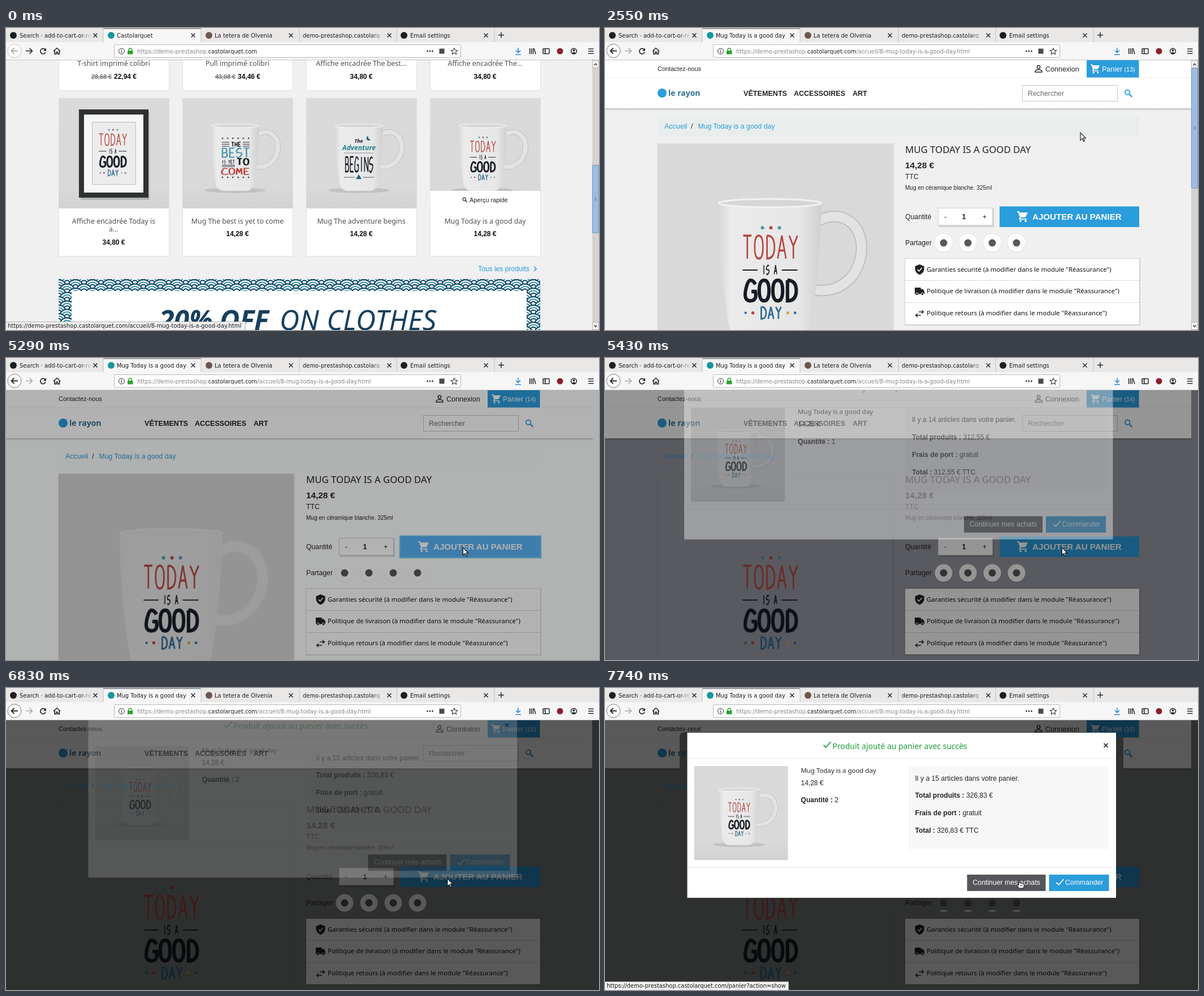
These frames come from a looping animation (1049x534 px, 8 s). An HTML page:

```html
<!DOCTYPE html>
<html lang="fr">
<head>
<meta charset="utf-8">
<title>Ajout au panier</title>
<style>
html, body { margin: 0; width: 100%; height: 100%; overflow: hidden; background: #f0f0f0; }
svg { display: block; }
#stage { width: 100vw; height: 100vh; }
text { fill: #232323; white-space: pre; }
.ui { font-family: "DejaVu Sans", sans-serif; fill: #1c1c1f; }
.sans { font-family: "Liberation Sans", Arial, sans-serif; }
.noto { font-family: "Noto Sans", sans-serif; }
.b { font-weight: 700; }
.i { font-style: italic; }
.mid { text-anchor: middle; }
.line { fill: none; stroke: #2a2a2e; stroke-width: 1.5; }
</style>
</head>
<body>
<svg id="stage" viewBox="0 0 1049 534" xmlns="http://www.w3.org/2000/svg"></svg>
<script>
const LOOP = 8000;
const BLUE = '#2b9cdc', RED = '#b8473f', TEAL = '#4a98ad', NAVY = '#171c27';
const SHOP = 'castolarquet.com';
const PAGE = '/accueil/8-mug-today-is-a-good-day.html';

// Markup helpers
const text = (x, y, s, size, cls = 'sans', fill = '', id = '') =>
  `<text x="${x}" y="${y}" font-size="${size}" class="${cls}"${fill && ` style="fill:${fill}"`}${id && ` id="${id}"`}>${s}</text>`;
const rect = (x, y, w, h, fill, more = '') =>
  `<rect x="${x}" y="${y}" width="${w}" height="${h}" fill="${fill}" ${more}/>`;
const dot = (x, y, r, fill, more = '') => `<circle cx="${x}" cy="${y}" r="${r}" fill="${fill}" ${more}/>`;
const line = (d, more = '') => `<path class="line" d="${d}" ${more}/>`;
const ink = (color, width) => `style="stroke:${color};stroke-width:${width}"`;
const group = (id, body, more = '') => `<g id="${id}" ${more}>${body}</g>`;
const photo = (x, y, size, body) =>
  `<svg x="${x}" y="${y}" width="${size}" height="${size}" viewBox="0 0 195 195">${body}</svg>`;
const cross = (x, y, r = 3.5) => line(`M${x - r} ${y - r}l${2 * r} ${2 * r}m0 ${-2 * r}l${-2 * r} ${2 * r}`);
const lens = (x, y, s, color) =>
  line(`M${x + s * .3} ${y + s * .3}l${s * .75} ${s * .75}`, ink(color, s * .35)) +
  `<circle cx="${x - s * .2}" cy="${y - s * .2}" r="${s * .65}" class="line" ${ink(color, s * .28)}/>`;
const tick = (x, y, color) => line(`M${x} ${y}l4 4l9-10`, ink(color, 1.8));
const cart = (x, y, s) => `<g transform="translate(${x} ${y}) scale(${s})">` +
  '<path d="M0 0h3l1 2h13l-4 7.5H6.5L5.5 11.5H15v1.7H3.5L2.7 12l1.7-2.6L1.7 1.7H0Z" fill="#fff"/>' +
  dot(5.5, 15.5, 1.6, '#fff') + dot(13.5, 15.5, 1.6, '#fff') + '</g>';

// Hand lettering on a 10 x 20 grid
const GLYPH = {
  T: 'M0 0H10M5 0V20', O: 'M5 0Q10 0 10 10T5 20T0 10T5 0', D: 'M1 0V20Q10 20 10 10T1 0',
  A: 'M0 20L5 0L10 20M2 13H8', Y: 'M0 0L5 9L10 0M5 9V20', I: 'M5 0V20',
  S: 'M9 2Q5 -2 1 4T5 10T8 17T0 18', G: 'M10 4Q8 0 5 0T0 10T5 20T10 11H6',
  B: 'M1 0V20H5Q10 20 10 15T5 10H1M5 10Q9 10 9 5T5 0H1', E: 'M10 0H1V20H10M1 10H8',
  N: 'M0 20V0L10 20V0', M: 'M0 20L1 0L5 12L9 0L10 20', C: 'M10 3Q8 0 5 0T0 10T5 20T10 17',
  H: 'M1 0V20M9 0V20M1 10H9'
};
const lettering = (word, x, y, w, h, color, weight) => {
  const sx = w / (14 * word.length - 4), sy = h / 20;
  return `<g transform="translate(${x} ${y}) scale(${sx} ${sy})" fill="none" stroke="${color}" stroke-width="${weight * 2 / (sx + sy)}">` +
    [...word].map((c, i) => c === ' ' ? '' : `<path d="${GLYPH[c]}" transform="translate(${14 * i})"/>`).join('') + '</g>';
};
const flags = (y, color) => [...Array(6)].map((_, i) =>
  `<path d="M${70 + 9.2 * i} ${y - 1.6}l3 1.600l-3 1.600z" fill="${color}"/>`).join('');

const todayArt =
  dot(87, 69.5, 1.4, TEAL) + dot(94, 69.5, 1.4, RED) + dot(101, 69.5, 1.4, TEAL) +
  lettering('TODAY', 71, 76, 45, 19, RED, 1.5) +
  lettering('IS A', 87, 100.5, 12, 7.5, NAVY, .9) +
  line('M70.5 104.5H83M103 104.5H116', ink(NAVY, .9)) +
  lettering('GOOD', 73, 113, 42, 17, NAVY, 2.9) +
  lettering('DAY', 85.5, 135, 17, 10, '#2c6a94', 1.3) +
  dot(73, 140, 1, '#2c6a94') + dot(79, 140, 1.3, RED) + dot(108, 140, 1.2, '#d9a04a') + dot(114, 140, 1.1, '#2c6a94');
const bestArt = flags(71, NAVY) + lettering('THE', 87, 78, 16, 7.5, NAVY, 1.4) +
  line('M70 78H83M70 81.5H83M70 85H83M107 78H119M107 81.5H119M107 85H119', ink(NAVY, .9)) +
  lettering('BEST', 70, 88.5, 48, 16, TEAL, 2.3) +
  lettering('IS YET', 70, 109.5, 22, 6.5, NAVY, .9) + lettering('TO', 97, 107, 20, 11, NAVY, 2.4) +
  line('M70 118.500H93M70 121H93', ink(NAVY, .9)) +
  lettering('COME', 70, 124, 48, 11, RED, 2.2) + flags(140, NAVY);
const adventureArt = text(93, 79, 'The', 9, 'noto i b mid', NAVY) +
  '<path d="M110 67a4 4 0 1 0 4 6a4 4 0 0 1-4-6z" fill="#1d5c78"/>' +
  text(93.5, 92, 'Adventure', 12.1, 'noto i b mid', '#24818a') +
  line('M67 97H120', 'stroke-dasharray="1.2 1.6" ' + ink(NAVY, 1)) +
  lettering('BEGINS', 69, 104, 49, 26, NAVY, 2.3) +
  line('M67 140H86M101 140H120', 'stroke-dasharray="2 1" ' + ink(NAVY, 1)) +
  '<path d="M88 143l5-8l5 8z" fill="#1d5c78"/>';

const mugBody = `<ellipse cx="93" cy="163" rx="54" ry="5" fill="#999" opacity=".35"/>
  <path d="M133 64C152 53 171 66 169 90C166 112 150 124 130 121" fill="none" stroke="#bdbdbd" stroke-width="9.5"/>
  <path d="M133 64C152 53 171 66 169 90C166 112 150 124 130 121" fill="none" stroke="#e3e3e3" stroke-width="7.8"/>
  <path d="M50.5 49C51 90 55 128 59 150Q61 163 73 164H113Q125 163 127 150C131 128 135 90 136 49Z" fill="url(#mugFill)"/>
  <ellipse cx="93.3" cy="49" rx="42.6" ry="3.4" fill="#d6d6d6" stroke="#f2f2f2" stroke-width="1.4"/>`;
const backdrop = rect(0, 0, 195, 195, 'url(#wall)');
const mug = art => backdrop + mugBody + art;
const poster = backdrop + rect(39, 24, 122, 156, '#000', 'opacity=".15"') + rect(36, 20, 123, 156, '#2f3233') +
  rect(45, 29, 105, 138, '#f6f6f6') + rect(59.5, 42.5, 77, 110, '#ececec', 'stroke="#bbb"') +
  `<g transform="translate(-5 -19) scale(1.08)">${todayArt}</g>`;

const waves = () => {
  let s = '';
  for (let row = 0; row < 6; row++)
    for (let x = -30 + row % 2 * 15; x <= 60; x += 30)
      [[15, '#17486b'], [12.8, '#fff'], [10.6, '#2a93a8'], [8.4, '#fff'], [6.2, '#17486b'], [4, '#fff']]
        .forEach(([r, c]) => s += dot(x, row * 7.5, r, c));
  return `<pattern id="waves" x="93" y="444" width="30" height="15" patternUnits="userSpaceOnUse"><g transform="translate(0 -15)">${s}</g></pattern>`;
};
const defs = `<defs>${waves()}
  <linearGradient id="mugFill"><stop offset="0" stop-color="#d8d8d8"/><stop offset=".12" stop-color="#ebebeb"/><stop offset=".8" stop-color="#e6e6e6"/><stop offset="1" stop-color="#cfcfcf"/></linearGradient>
  <linearGradient id="wall" x2="0" y2="1"><stop offset="0" stop-color="#dadada"/><stop offset=".8" stop-color="#d9d9d9"/><stop offset="1" stop-color="#d2d2d2"/></linearGradient>
  <linearGradient id="fade"><stop offset="0" stop-color="#e9e8e7" stop-opacity="0"/><stop offset="1" stop-color="#e9e8e7"/></linearGradient>
  <linearGradient id="under" x2="0" y2="1"><stop offset="0" stop-opacity=".22"/><stop offset="1" stop-opacity="0"/></linearGradient>
  <filter id="dim" filterUnits="userSpaceOnUse" x="0" y="0" width="1049" height="534" color-interpolation-filters="sRGB">
    <feComponentTransfer>${['R', 'G', 'B'].map(c => `<feFunc${c} class="slope" type="linear" slope="1"/>`).join('')}</feComponentTransfer></filter></defs>`;

// Product listing
const columns = [93, 312, 531, 750];
const card = (x, y, h) => rect(x + .5, y + .5, 195, h, '#fff', 'stroke="#e0e0e0"');
const price = (x, y, s) => text(x, y, s, 12, 'sans b mid', '#111');
const sale = (x, old, now) => text(x - 21.5, 90, old, 10.8, 'sans b mid', '#6c6c6c') +
  line(`M${x - 40} 86.5h37`, ink('#6c6c6c', 1)) + price(x + 20.5, 90, now);
const heading = (i, y, s) => text(columns[i] + 97.5, y, s, 12.4, 'noto mid', '#4b5254');
const listing = rect(0, 57, 1049, 477, '#f0f0f0') +
  columns.map(x => card(x, 40, 70) + card(x, 124, 279)).join('') +
  ['T-shirt imprimé colibri', 'Pull imprimé colibri', 'Affiche encadrée The best...', 'Affiche encadrée The...']
    .map((s, i) => heading(i, 67, s)).join('') +
  sale(190.5, '28,68 €', '22,94 €') + sale(409.5, '43,08 €', '34,46 €') + price(628.5, 90, '34,80 €') + price(847.5, 90, '34,80 €') +
  [poster, mug(bestArt), mug(adventureArt), mug(todayArt)].map((p, i) => photo(columns[i], 124, 195, p)).join('') +
  ['Affiche encadrée Today is', 'Mug The best is yet to come', 'Mug The adventure begins', 'Mug Today is a good day']
    .map((s, i) => heading(i, 346, s)).join('') + heading(0, 360, 'a...') +
  price(190.5, 383, '34,80 €') + [1, 2, 3].map(i => price(columns[i] + 97.5, 368, '14,28 €')).join('') +
  rect(750.5, 288, 194.5, 32, '#fff') + lens(811.5, 303.5, 4, '#232323') + text(820, 308, 'Aperçu rapide', 10.9) +
  text(835, 430, 'Tous les produits', 12.1, 'sans', BLUE) + line('M934 422l4 4l-4 4', ink(BLUE, 1.6)) +
  rect(93, 444, 852, 90, 'url(#waves)') + rect(116, 465, 805, 69, '#fff') +
  text(271, 533.5, '20% OFF', 48.3, 'noto b i', '#17405f') +
  `<g letter-spacing=".6">${text(484, 533.5, 'ON CLOTHES', 48.3, 'noto i', '#17405f')}</g>`;

// Product page
const socialX = [599, 642, 685, 728];
const paper = rect(0, 57, 1037, 85, '#fff') + rect(0, 87.5, 1037, 1, '#efefef') + rect(0, 142, 1038, 4, 'url(#under)') +
  rect(93, 155, 852, 37, '#e9eeed', 'id="crumbs"') +
  rect(738.5, 101.5, 168, 28, '#fff', 'stroke="#c4c6c7"') +
  rect(590, 319, 98, 33, '#000', 'opacity=".12"') + rect(589.5, 318.5, 96, 30, '#fff', 'stroke="#c9d3d6"') +
  socialX.map(x => dot(x, 381, 16, '#000', 'opacity=".06"') + dot(x, 380, 15.5, '#fff')).join('') +
  rect(530, 407, 417, 119, '#000', 'opacity=".13"') + rect(531, 408, 414, 116, '#fff') +
  line('M531 446.5H945M531 485.5H945', ink('#d8d8d8', 1));
const assurance = (y, s) => text(569, y, s + ' (à modifier dans le module "Réassurance")', 11.4, 'noto', '#111');
const inkLayer =
  text(93, 76, 'Contactez-nous', 11) +
  '<circle cx="767" cy="69" r="2.7" class="line"/>' + line('M761 78v-1.5q1-3 6-3t6 3V78z') +
  text(779, 77, 'Connexion', 12.5) + rect(852, 57, 92.5, 30.5, BLUE) + cart(859, 64, .95) +
  text(879, 77, 'Panier', 12.5, 'sans', '#fff') + text(918.5, 77, '(13)', 10.8, 'sans', '#fff', 'count') +
  dot(101, 115, 8, BLUE) + text(112, 120, 'le rayon', 14, 'noto b', '#2f6f96') +
  text(245, 120, 'VÊTEMENTS', 12.6, 'sans b') + text(334, 120, 'ACCESSOIRES', 12.5, 'sans b') + text(438, 120, 'ART', 12.5, 'sans b') +
  text(748, 120, 'Rechercher', 12.4, 'sans', '#666d70') + lens(925.5, 115, 6.5, BLUE) +
  text(105, 178, 'Accueil', 12.5, 'sans', BLUE) + text(152, 178, '/', 12.3) + text(164.5, 178, 'Mug Today is a good day', 12.25, 'sans', BLUE) +
  photo(93, 205, 416, todayArt) +
  text(531, 221, 'MUG TODAY IS A GOOD DAY', 16.8, 'noto') + text(531, 248, '14,28 €', 15.3, 'sans b') +
  text(531, 267, 'TTC', 12.3) + text(531, 286, 'Mug en céramique blanche. 325ml', 10) +
  text(531, 338, 'Quantité', 12.25) + text(602, 338, '-', 12, 'sans mid') + text(635, 338, '1', 12.5, 'sans b mid') + text(671.5, 338, '+', 12, 'sans mid') +
  rect(697, 315, 249, 38, 'none', 'id="focus" stroke="#6fd0f0" stroke-width="2.5"') + rect(698, 315.5, 247, 36.5, BLUE, 'id="add"') +
  cart(729, 324, 1.12) + text(756, 339, 'AJOUTER AU PANIER', 15.1, 'sans b', '#fff') +
  text(531, 384, 'Partager', 12.25) + socialX.map(x => dot(x, 380, 6.5, '#58595d')).join('') +
  assurance(431, 'Garanties sécurité') + assurance(469, 'Politique de livraison') + assurance(508, 'Politique retours') +
  '<path d="M556.500 418l8 3.300v6q-1 6-8 9q-7-3-8-9v-6z" fill="#222"/>' + line('M552.500 427l3 3l5-6', ink('#fff', 1.6)) +
  '<path d="M548 459h10.500v2.500h3.500l3 4v5h-17z" fill="#222"/>' + dot(552, 470.5, 2.2, '#222', 'stroke="#fff"') + dot(561.5, 470.5, 2.2, '#222', 'stroke="#fff"') +
  line('M555 502h8m-3-3l3.500 3l-3.500 3M559 508h-9m3-3l-3.500 3l3.500 3');
const product = rect(0, 57, 1049, 477, '', 'class="bg"') +
  rect(92, 204, 419, 340, '#000', 'opacity=".07"') + rect(93, 205, 416, 329, '', 'id="wallFill"') +
  group('mugBody', photo(93, 205, 416, mugBody)) +
  group('paper', paper) + rect(123, 78, 792, 315, '', 'id="halo" class="bg" rx="8"') + group('ink', inkLayer);

// Confirmation dialog
const row = (x, y, label, value) => text(x, y, `<tspan class="b">${label} :</tspan> ${value}`, 12.1);
const dialog = (id, dx, count, qty, total) => group(id, `<g transform="translate(${dx} 0)">` +
  rect(140, 79, 758.5, 292, '#fff') + line('M140 124.500h758M140 317.500h758', ink('#e7e7e7', 1)) +
  tick(381, 101, '#1f9d3a') + text(397, 107.5, 'Produit ajouté au panier avec succès', 13.9, 'noto', '#1f9d3a') +
  line('M877 98l7 7m0-7l-7 7', ink('#444', 2)) + photo(152, 138, 166.3, mug(todayArt)) +
  text(341, 149.5, 'Mug Today is a good day', 11.45, 'noto') + text(341, 171.5, '14,28 €', 12) + row(341, 202, 'Quantité', qty) +
  rect(531, 138, 355, 147, '#f7f7f7') + text(543, 163.5, `Il y a ${count} articles dans votre panier.`, 12.15) +
  row(543, 194, 'Total produits', total + ' €') + row(543, 225, 'Frais de port', 'gratuit') + row(543, 256, 'Total', total + ' € TTC') +
  rect(635, 330, 139, 29, '#55565b') + text(645, 348, 'Continuer mes achats', 12.25, 'sans', '#fff') +
  rect(780, 330, 106, 29, BLUE) + tick(793, 344, '#fff') + text(808.5, 348, 'Commander', 12.25, 'sans', '#fff') + '</g>');

const status = (id, w, path) => group(id, rect(-.5, 519.5, w, 15, '#efefef', 'stroke="#b5b5b5"') +
  text(3, 530, 'https://demo-prestashop.' + SHOP + path, 9.93, 'ui'));

// Browser window
const scrollbar = rect(1037, 57, 12, 477, '#d5d2cf') + rect(1037.5, 57.5, 11, 13, '#f3f2f1', 'stroke="#b9b6b3"') +
  rect(1037.5, 520.5, 11, 13, '#f3f2f1', 'stroke="#b9b6b3"') +
  line('M1040.500 66l2.500-3l2.500 3M1040.500 525.500l2.500 3l2.500-3', ink('#333', 1.2)) +
  rect(1037.5, 71, 11, 212, '#9dbce0', 'id="thumb" stroke="#6f93bf"') +
  group('grip', line('M1041 175h4m-4 2h4m-4 2h4', ink('#557aa8', .8)));
const back = (on, c) => line('M21 40.500H10m4.500-5l-5 5l5 5', ink(c, 1.8));
const chrome = rect(0, 0, 1049, 26, '#e9e8e7') + rect(172, 0, 173, 26, '#f6f6f7') + rect(172, 0, 173, 2, '#9ba0a6') +
  rect(0, 25, 1049, 32, '#f6f6f7') + rect(0, 56, 1049, 1, '#c6c6c6') +
  [172, 345, 519, 691, 864].map(x => rect(x - .5, 0, 1, 25, '#c2c2c2')).join('') +
  [158, 331, 504, 678, 849].map(x => cross(x, 13)).join('') + line('M871 12.500h10m-5-5v10') +
  dot(13, 13, 6, '#1b1f23') + dot(186, 13, 6, '#15989d', 'id="favicon"') + dot(359, 13, 6, '#6d564d') + dot(704, 13, 6, '#1b1f23') +
  text(24, 16.5, 'Search · add-to-cart-or-re', 10, 'ui') + text(196, 16.5, '', 9.95, 'ui', '', 'tab') +
  text(369, 16.5, 'La tetera de Olvenia', 10, 'ui') + text(525, 16.5, 'demo-prestashop.castolarq', 9.95, 'ui') + text(715, 16.5, 'Email settings', 10, 'ui') +
  rect(130, 5, 22, 18, 'url(#fade)') + rect(646, 5, 24, 18, 'url(#fade)') +
  dot(15, 40.5, 12, '#fff', 'id="backRing"') + group('back', line('M21 40.500H10m4.500-5l-5 5l5 5', ink('#2a2a2e', 1.8))) +
  group('forward', line('M35 40.500H46m-4.500-5l5 5l-5 5', ink('currentColor', 1.6))) +
  group('reload', line('M69.500 38.500A4.700 4.700 0 1 0 70 42.500', ink('currentColor', 1.7)) + '<path d="M71 35.500v5h-5z" fill="currentColor"/>') +
  group('stop', cross(65.5, 41, 4)) +
  line('M84 41l6-5.500l6 5.500M86 40v6h3v-3.500h2.500V46h3v-6', ink('#222', 1.6)) +
  rect(191.5, 29.5, 613, 22.5, '#fff', 'rx="2" stroke="#b6b6b9"') +
  '<circle cx="204.500" cy="41" r="5" class="line" style="stroke-width:1"/>' + line('M204.500 40v4m0-6v1', ink('#333', 1.2)) +
  rect(215, 40, 9.5, 6.5, '#2ca32f', 'rx="1"') + line('M217 40.500v-2a2.700 2.700 0 0 1 5.500 0v2', ink('#2ca32f', 1.5)) +
  text(232, 44.5, `<tspan style="fill:#85858a">https://demo-prestashop.</tspan>${SHOP}<tspan id="path" style="fill:#85858a"></tspan>`, 9.93, 'ui') +
  [745.5, 750, 754.5].map(x => dot(x, 41, 1.4, '#333')).join('') + rect(766.5, 36.5, 9, 9, '#4a4a4f') +
  line('M793 35.500l1.700 3.800l4 .4l-3 2.700l.9 4l-3.600-2.100l-3.600 2.100l.9-4l-3-2.700l4-.4z', ink('#333', 1.1)) +
  line('M906 35v8m-4-3.500l4 4l4-4M901 47h10', ink('#2b8de0', 1.6)) +
  line('M926.500 36v10m3-10v10m3-10v10m1.500-10l3 10') +
  '<rect x="950" y="36.500" width="11" height="9" rx="1" class="line"/>' + line('M954 36.500v9m-2.500-6.500h1m-1 2.500h1') +
  dot(980, 41, 5.5, '#8c1f2b') + '<circle cx="1004.500" cy="41" r="5" class="line"/>' + dot(1004.5, 39.5, 1.9, '#2a2a2e') +
  '<path d="M1001 44.500q3.500-4 7 0q-3.500 2.500-7 0z" fill="#2a2a2e"/>' + line('M1030 37h9.500m-9.500 4h9.500m-9.500 4h9.500');
const pointer = group('pointer',
  group('arrow', '<path d="M0 0v13.500l3.200-2.900l2.300 4.900l2-1l-2.300-4.700h4.200z" fill="#fff" stroke="#111" stroke-width="1.1"/>') +
  group('hand', '<path d="M-1-1.500q1-1.200 2 0V3l6 1.200q1.500.4 1.300 2.300l-.8 5.500H-.500l-3.700-5q.2-2 3.200.1z" fill="#fff" stroke="#111"/>' + line('M2.500 6v3m2.300-3v3', ink('#111', .8))));

const stage = document.getElementById('stage');
stage.innerHTML = defs + group('listing', listing) + group('product', product) +
  dialog('first', 0, 14, 1, '312,55') + dialog('second', 5.5, 15, 2, '326,83') +
  group('scrollbar', scrollbar) + status('itemLink', 424, PAGE) + status('cartLink', 325, '/panier?action=show') + chrome + pointer;

// Timelines: [ms, values...]
const CURSOR = [[2910, 841, 185], [3250, 836, 232], [3680, 809, 335], [6650, 808, 335], [6830, 781, 337], [7100, 768, 337], [7460, 764, 339], [7740, 733, 342]];
// brightness, page grey (r, g, b), photo wall (r, g, b), mug opacity
const DIM = [[5210, 1, 240, 240, 240, 217, 217, 217, 1], [5290, .7, 178, 179, 179, 149, 149, 149, .12],
  [5400, .585, 89, 90, 95, 89, 90, 95, 0], [6650, .585, 89, 90, 95, 89, 90, 95, 0], [6770, .35, 46, 48, 47, 46, 48, 47, 0]];
const BUTTON = [[3680, 43, 156, 220], [3870, 35, 145, 160], [4630, 35, 145, 160], [5000, 89, 178, 245], [5290, 89, 178, 245], [5430, 43, 156, 220]];
// opacity, vertical offset
const FIRST = [[5370, 0, -73], [5520, 1, -17], [5680, 1, 0]];
const SECOND = [[6740, 0, -73], [6830, .18, -36], [6910, 1, -12], [7040, 1, 0]];

const at = (table, t) => {
  const next = table.findIndex(k => k[0] > t);
  if (next === 0) return table[0].slice(1);
  if (next < 0) return table[table.length - 1].slice(1);
  const a = table[next - 1], b = table[next], p = (t - a[0]) / (b[0] - a[0]);
  return a.slice(1).map((v, i) => v + (b[i + 1] - v) * p);
};
const el = id => document.getElementById(id);
const show = (id, on) => { el(id).style.display = on ? '' : 'none'; };
const rgb = c => `rgb(${c.map(Math.round)})`;
const pose = (id, [opacity, dy]) => {
  el(id).style.opacity = opacity;
  el(id).setAttribute('transform', `translate(0 ${dy})`);
};

function render(t) {
  const loaded = t >= 1880, loading = t >= 1440 && t < 2270;
  show('listing', !loaded);
  show('product', loaded);
  show('itemLink', t < 1480);
  show('cartLink', t >= 7100);
  el('tab').textContent = loaded ? 'Mug Today is a good day' : 'Castolarquet';
  el('path').textContent = loaded ? PAGE : '';
  el('favicon').setAttribute('cx', loading ? 186 + 4 * Math.sin(t / 130) : 186);
  el('favicon').setAttribute('r', loading ? 2.5 : 6);
  el('backRing').setAttribute('stroke', loaded ? '#77777b' : '#c4c4c6');
  el('back').style.opacity = loaded ? 1 : .4;
  el('forward').style.color = loaded ? '#aaaaad' : '#222226';
  show('reload', !loading);
  show('stop', loading);
  el('reload').style.color = t >= 2270 && t < 2550 ? '#a5a5a8' : '#222226';

  show('scrollbar', t < 5210);
  el('thumb').setAttribute('y', loaded ? 71 : 243);
  el('thumb').setAttribute('height', loaded ? 212 : 119);
  el('grip').setAttribute('transform', `translate(0 ${loaded ? 0 : 125.5})`);

  const dim = at(DIM, t);
  el('paper').style.filter = el('ink').style.filter = dim[0] < 1 ? 'url(#dim)' : '';
  document.querySelectorAll('.slope').forEach(e => e.setAttribute('slope', dim[0]));
  document.querySelectorAll('.bg').forEach(e => e.setAttribute('fill', rgb(dim.slice(1, 4))));
  el('wallFill').setAttribute('fill', rgb(dim.slice(4, 7)));
  el('mugBody').style.opacity = el('crumbs').style.opacity = dim[7];
  el('add').setAttribute('fill', rgb(at(BUTTON, t)));
  show('focus', t >= 4750 && t < 5430);
  el('count').textContent = t < 5210 ? '(13)' : t < 6650 ? '(14)' : '(15)';

  show('first', t >= 5370 && t < 6650);
  pose('first', at(FIRST, t));
  show('second', t >= 6740);
  pose('second', at(SECOND, t));
  show('halo', t >= 5520 && t < 6650 || t >= 6910);
  el('halo').setAttribute('x', t < 6650 ? 123 : 132);
  el('halo').setAttribute('width', t < 6650 ? 792 : 785);

  const [x, y] = at(CURSOR, t);
  const hand = t >= 3640 && t < 4700 || t >= 7100;
  show('pointer', t >= 1440);
  show('hand', hand);
  show('arrow', !hand);
  el('pointer').setAttribute('transform', `translate(${x} ${y})`);
}

const start = performance.now();
const tickFrame = now => {
  render(Math.max(0, now - start) % LOOP);
  requestAnimationFrame(tickFrame);
};
render(0);
requestAnimationFrame(tickFrame);
</script>
</body>
</html>
```
